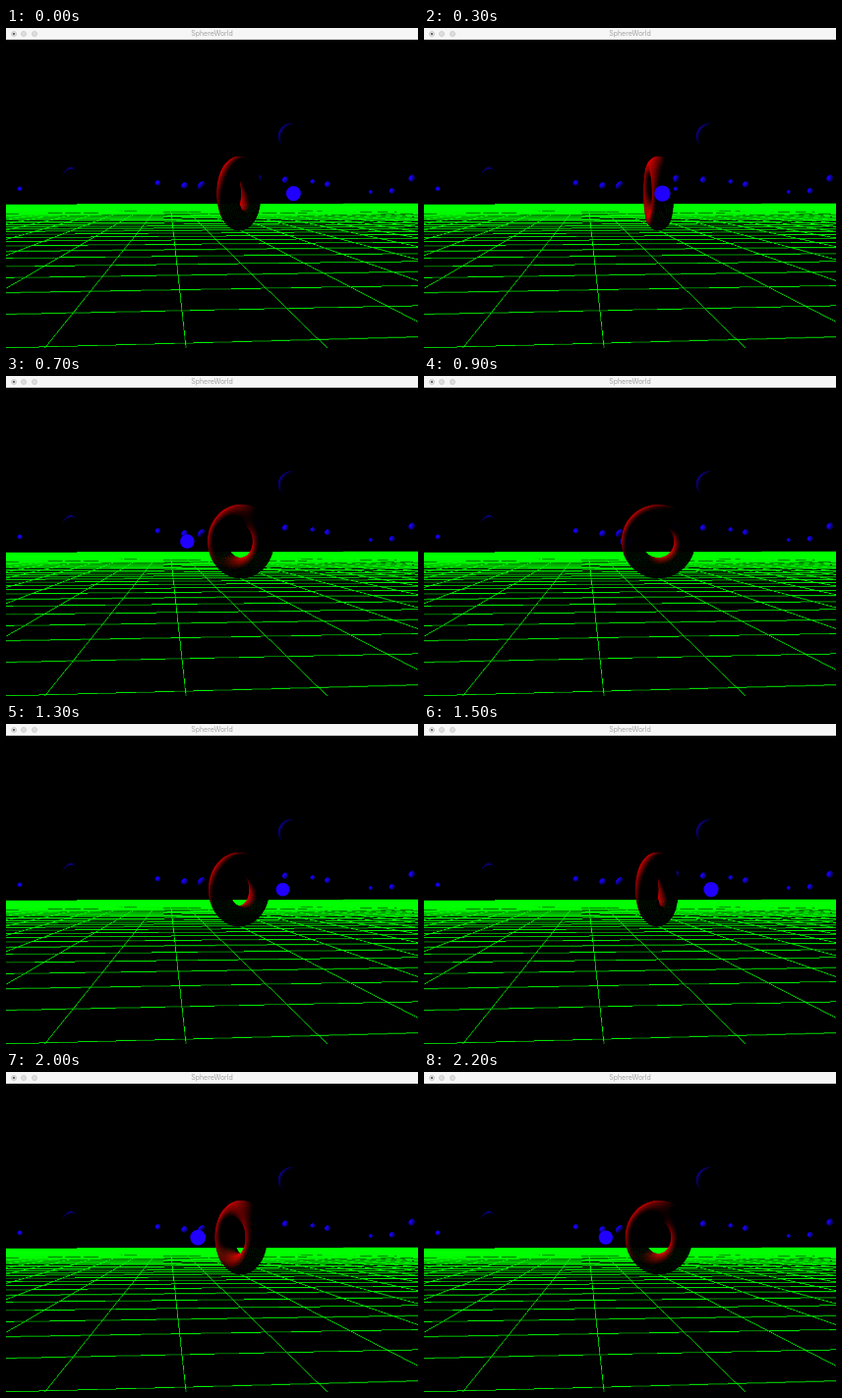
An HTML page with a canvas that plays this animation: 419x326 px, repeating every 2.3 s.

```html
<!DOCTYPE html>
<html lang="en">
<head>
<meta charset="utf-8">
<title>SphereWorld</title>
<style>
  html, body { margin: 0; width: 419px; height: 326px; overflow: hidden; background: #000; }
  canvas { position: absolute; left: 0; top: 0; }
  .bar {
    position: absolute; left: 0; top: 0; width: 419px; height: 12px; box-sizing: border-box;
    background: #f6f6f6; border-bottom: 1px solid #d8d8d8;
    font: 7px/12px Inter, Roboto, sans-serif; color: #a2a2a2; text-align: center;
  }
  .bar i {
    position: absolute; top: 2.5px; width: 6px; height: 6px; box-sizing: border-box;
    border: .5px solid #cfcfcf; border-radius: 50%; background: #dedede;
  }
  .bar i:first-child::after {
    content: ""; position: absolute; left: 1.5px; top: 1.5px; width: 2px; height: 2px;
    border-radius: 50%; background: #444;
  }
</style>
</head>
<body>
<canvas id="stage" width="419" height="326"></canvas>
<div class="bar"><i style="left:4.5px"></i><i style="left:15px"></i><i style="left:25.5px"></i>SphereWorld</div>
<script>
const W = 419, H = 326, TOP = 11.75, LOOP = 2300, STEP = 100;
const RAD = Math.PI / 180, TAU = Math.PI * 2;
const MID_X = W / 2, MID_Y = 168.6;
const FOCAL = 157.1 / Math.tan(17.5 * RAD);
const YAW = 5 * RAD, CAM = { x: -1.06, z: 4.8 };
const FLOOR_Y = -0.55;

// Eye space: [right, up, depth]
const LIGHT = [-4.2, 4, 9.8];
const CENTER = [0.42, 0, 7.364];

const ctx = document.getElementById('stage').getContext('2d');
const project = ([x, y, d]) => [MID_X + x / d * FOCAL, MID_Y - y / d * FOCAL];

function toEye(x, y, z) {
  const dx = x - CAM.x, dz = z - CAM.z, c = Math.cos(YAW), s = Math.sin(YAW);
  return [dx * c + dz * s, y, dx * s - dz * c];
}

function diffuse(pos, normal) {
  const l = LIGHT.map((v, i) => v - pos[i]);
  const dot = l[0] * normal[0] + l[1] * normal[1] + l[2] * normal[2];
  return Math.max(0, dot / Math.hypot(...l));
}

// Lit quads of a surface; point(u, v) returns { pos, normal }
function mesh(point, nu, nv, vSpan, tint) {
  const quads = [];
  for (let i = 0; i < nu; i++) for (let j = 0; j < nv; j++) {
    const at = (a, b) => point((i + a) / nu * TAU, (j + b) / nv * vSpan);
    const { pos, normal } = at(0.5, 0.5);
    if (pos[0] * normal[0] + pos[1] * normal[1] + pos[2] * normal[2] > 0.6) continue;
    const corners = [[0, 0], [1, 0], [1, 1], [0, 1]].map(([a, b]) => project(at(a, b).pos));
    quads.push({ depth: pos[2], corners, color: tint(diffuse(pos, normal)) });
  }
  return quads;
}

function paint(c, items) {
  items.sort((a, b) => b.depth - a.depth);
  c.lineWidth = 0.5;
  for (const { corners, color, disc } of items) {
    c.beginPath();
    c.fillStyle = c.strokeStyle = color;
    if (disc) c.arc(...disc, 0, TAU);
    else corners.forEach(p => c.lineTo(...p));
    c.closePath();
    c.fill();
    if (!disc) c.stroke();
  }
}

function torus(turn) {
  const R = 0.4, r = 0.15, c = Math.cos(turn), s = Math.sin(turn);
  const spin = (x, y, z) => [x * c + z * s, y, x * s - z * c];
  const point = (a, b) => {
    const ring = R + r * Math.cos(b), n = Math.cos(b);
    const p = spin(ring * Math.cos(a), ring * Math.sin(a), r * Math.sin(b));
    return {
      pos: p.map((v, i) => v + CENTER[i]),
      normal: spin(n * Math.cos(a), n * Math.sin(a), Math.sin(b))
    };
  };
  return mesh(point, 56, 28, TAU, k => `rgb(${Math.round(255 * k)},0,0)`);
}

function ball(sx, sy, size) {
  const d = 0.1 * FOCAL / size;
  const mid = [(sx - MID_X) / FOCAL * d, (MID_Y - sy) / FOCAL * d, d];
  const point = (u, v) => {
    const n = [Math.sin(v) * Math.cos(u), Math.cos(v), Math.sin(v) * Math.sin(u)];
    return { pos: n.map((q, i) => mid[i] + q * 0.1), normal: n };
  };
  return mesh(point, 32, 18, Math.PI, k => `rgb(${Math.round(32 * k)},0,${Math.round(255 * k)})`);
}

// Hard-edged one-pixel lines on an 800 x 600 raster, scaled down afterwards
function drawFloor(c) {
  const w = 800, h = 600, k = w / W;
  const buf = Object.assign(document.createElement('canvas'), { width: w, height: h });
  const bc = buf.getContext('2d'), img = bc.createImageData(w, h);
  const plot = (x, y) => {
    if (x < 0 || y < 0 || x >= w || y >= h) return;
    const o = (y * w + x) * 4;
    img.data[o + 1] = img.data[o + 3] = 255;
  };
  const line = (a, b) => {
    const near = 0.3;
    if (a[2] < b[2]) [a, b] = [b, a];
    if (a[2] < near) return;
    if (b[2] < near) {
      const t = (a[2] - near) / (a[2] - b[2]);
      b = a.map((v, i) => v + (b[i] - v) * t);
    }
    const [p, q] = [a, b].map(e => project(e)).map(([x, y]) => [x * k, (y - TOP) * k]);
    const m = Math.abs(q[0] - p[0]) > Math.abs(q[1] - p[1]) ? 0 : 1, n = 1 - m;
    const [s, e] = p[m] < q[m] ? [p, q] : [q, p];
    const slope = (e[n] - s[n]) / (e[m] - s[m]);
    const end = Math.min(m ? h : w, e[m]);
    for (let i = Math.max(0, Math.ceil(s[m])); i < end; i++) {
      const j = Math.floor(s[n] + (i + 0.5 - s[m]) * slope);
      m ? plot(j, i) : plot(i, j);
    }
  };
  for (let g = -20; g <= 20; g += 0.5) {
    line(toEye(g, FLOOR_Y, -20), toEye(g, FLOOR_Y, 20));
    line(toEye(-20, FLOOR_Y, g), toEye(20, FLOOR_Y, g));
  }
  bc.putImageData(img, 0, 0);
  c.imageSmoothingQuality = 'high';
  // A second pass strengthens the thin lines
  for (let i = 0; i < 2; i++) c.drawImage(buf, 0, TOP, W, h / k);
}

function makeScene() {
  const scene = Object.assign(document.createElement('canvas'), { width: W, height: H });
  const c = scene.getContext('2d');
  c.fillRect(0, 0, W, H);
  drawFloor(c);
  const balls = [
    [14, 164, 2], [66, 150, 7], [154.5, 158, 2.4], [182, 161, 3.2], [200, 161.5, 4.4],
    [227, 153, 1.7], [257, 154, 3.5], [256, 164, 1.8], [284.5, 155, 3], [289.5, 110, 12],
    [312, 156.5, 2], [327.5, 159.5, 2.8], [371, 167, 1.6], [393, 166, 2.6], [413.5, 153.5, 3.3]
  ];
  balls.forEach(b => paint(c, ball(...b)));
  return scene;
}

const scene = makeScene();
let shown = -1;

function draw(now) {
  const time = Math.floor(now % LOOP / STEP) * STEP;
  if (time !== shown) {
    shown = time;
    const turn = (60.7 + 0.121 * time) * RAD;
    const orbit = 2 * turn - 105 * RAD;
    const pos = [CENTER[0] + 0.8 * Math.cos(orbit), 0, CENTER[2] - 0.8 * Math.sin(orbit)];
    const moon = { depth: pos[2], color: '#2000ff', disc: [...project(pos), 0.108 * FOCAL / pos[2]] };
    ctx.drawImage(scene, 0, 0);
    paint(ctx, [...torus(turn), moon]);
  }
}

const start = performance.now();
function tick() {
  draw(performance.now() - start);
  requestAnimationFrame(tick);
}
tick();
</script>
</body>
</html>
```
